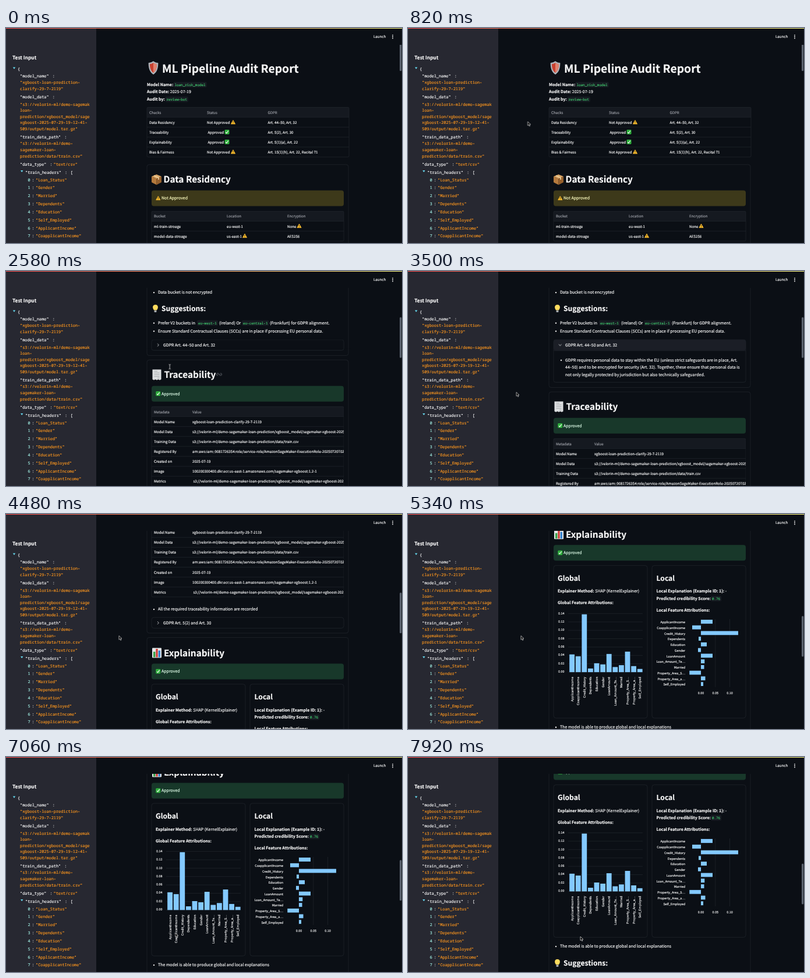
Animation, 680 px wide and 370 px high, one loop 8000 ms. Source, as an HTML page:

```html
<!DOCTYPE html>
<html lang="en">
<head>
<meta charset="utf-8">
<title>ML Pipeline Audit Report</title>
<style>
@property --scroll { syntax: "<number>"; inherits: true; initial-value: 0; }
html, body { margin: 0; width: 100%; height: 100%; overflow: hidden; background: #0b0f15; }
svg { position: absolute; left: 0; top: 0; animation: scroll 8s linear infinite; }
text { font-family: "Noto Sans CJK JP", "Noto Sans CJK SC", "Noto Sans CJK", "Open Sans", sans-serif;
  color: #fafafa; fill: currentColor; stroke: currentColor; stroke-width: .16;
  white-space: pre; text-rendering: geometricPrecision; }
.b { font-weight: 700; }
.dim { color: #9a9da4; }
.mono { font-family: "Noto Sans Mono", "DejaVu Sans Mono", monospace; }
.code { color: #3fc86d; }
.val { color: #fd971f; }
.idx { color: #a1efe4; }
.end { text-anchor: end; }
.mid { text-anchor: middle; }
.line { fill: none; stroke: #262a32; stroke-width: .6; }
.page { transform: translateY(calc(var(--scroll) * -1px)); }
.thumb { transform: translateY(calc(var(--scroll) * .197px)); }
.below { animation: expand 8s linear infinite; }
.opened { animation: reveal 8s linear infinite; }
.chevron { transform-box: fill-box; transform-origin: center; animation: turn 8s linear infinite; }
.cursor { animation: move 8s linear infinite; }
.arrow { animation: arrow 8s step-end infinite; }
.beam { animation: beam 8s step-end infinite; }
@keyframes scroll {
  0%, 15.25% { --scroll: 0; }
  17.75% { --scroll: 39; }
  20% { --scroll: 150; }
  22.5% { --scroll: 300; }
  24.25% { --scroll: 362; }
  26%, 46% { --scroll: 383.5; }
  48% { --scroll: 425; }
  51% { --scroll: 560; }
  53.5% { --scroll: 645; }
  56%, 58% { --scroll: 666; }
  60% { --scroll: 710; }
  63% { --scroll: 825; }
  67.5%, 97% { --scroll: 879; animation-timing-function: ease-in; }
  99%, 100% { --scroll: 911; }
}
@keyframes expand {
  0%, 36% { transform: none; animation-timing-function: ease-in-out; }
  40.5%, 100% { transform: translateY(55px); }
}
@keyframes reveal {
  0%, 36% { opacity: 0; }
  38%, 100% { opacity: 1; }
}
@keyframes turn {
  0%, 36% { transform: none; }
  38%, 100% { transform: rotate(90deg); }
}
@keyframes move {
  0%, 2.75% { transform: translate(262px, 376px); animation-timing-function: ease-out; }
  12.25%, 26% { transform: translate(201.5px, 145.5px); }
  30.25% { transform: translate(215px, 149px); }
  32.25% { transform: translate(279px, 161px); animation-timing-function: ease-out; }
  35.25%, 37% { transform: translate(300px, 124px); animation-timing-function: ease-in-out; }
  43.75% { transform: translate(186px, 208.5px); }
  56%, 71.75% { transform: translate(194px, 209.5px); }
  78% { transform: translate(229px, 228.5px); animation-timing-function: ease-out; }
  91.25%, 100% { transform: translate(296px, 309px); }
}
@keyframes arrow {
  0% { opacity: 0; }
  2.75% { opacity: 1; }
  31.5% { opacity: 0; }
  33.5%, 100% { opacity: 1; }
}
@keyframes beam {
  0% { opacity: 0; }
  31.5% { opacity: 1; }
  33.5%, 100% { opacity: 0; }
}
</style>
</head>
<body>
<svg id="stage" width="680" height="370"></svg>
<script>
const BG = '#0b0f15';
const BODY = 7, SMALL = 6.15, TINY = 5.35, H1 = 19.3, H2 = 15.35, H3 = 12.1, JSON_SIZE = 6.88, CODE = 5.9;

// y is the middle of the capitals
const text = (x, y, str, size = BODY, cls = '', extra = '') =>
  `<text x="${x}" y="${y + size * .37}" font-size="${size}" class="${cls}" ${extra}>${str}</text>`;
const bold = str => `<tspan class="b">${str}</tspan>`;
const rect = (x, y, w, h, fill, r = 0) => `<rect x="${x}" y="${y}" width="${w}" height="${h}" rx="${r}" fill="${fill}"/>`;
const box = (x, y, w, h, r = 4) => `<rect class="line" x="${x}" y="${y}" width="${w}" height="${h}" rx="${r}"/>`;
const path = (d, fill = 'none', stroke = 'none', w = 1) => `<path d="${d}" fill="${fill}" stroke="${stroke}" stroke-width="${w}"/>`;
const line = d => `<path class="line" d="${d}"/>`;
const at = (x, y, inner) => `<g transform="translate(${x} ${y})">${inner}</g>`;
const list = (items, fn) => items.map(fn).join('');

const chip = (x, y, str) =>
  rect(x, y - 4.7, str.length * CODE * .6 + 4, 9.4, '#171b22', 2) + text(x + 2, y, str, CODE, 'mono code');
const bullet = (x, y, str) => `<circle cx="${x - 7}" cy="${y + .6}" r="1.2" fill="#fafafa"/>` + text(x, y, str);

// Small pictograms, centred on x, y
const warn = (x, y) => at(x, y, path('M0 -3.4 3.7 3.2 -3.7 3.2Z', '#ffc02e', '#ffc02e', .6) + path('M0 -1.4V1M0 1.8V2.5', 'none', '#33270a', .9));
const check = (x, y) => at(x, y, rect(-4, -4, 8, 8, '#2fae3c', 1.4) + path('M-2.2 .2 -.7 2 2.3 -2.2', 'none', '#fff', 1.1));
const shield = (x, y) => at(x, y,
  path('M0 -11.5Q4 -8.5 8.3 -8.5C8.5 1 6 8 0 11.5C-6 8 -8.5 1 -8.3 -8.5Q-4 -8.5 0 -11.5Z', '#aeb4ba') +
  path('M0 -8.8Q3 -6.6 6 -6.4C6 1 4 6 0 8.6C-4 6 -6 1 -6 -6.4Q-3 -6.6 0 -8.8Z', '#c9402f') +
  path('M0 -8.8Q3 -6.6 6 -6.4C6 1 4 6 0 8.6Z', '#e0826f'));
const parcel = (x, y) => at(x, y,
  path('M0 -8.5 8.5 -5 0 -1 -8.5 -5Z', '#d9a566') + path('M-8.5 -5 0 -1V9.5L-8.5 5Z', '#b57a3d') +
  path('M8.5 -5 0 -1V9.5L8.5 5Z', '#96602c') + path('M-4.5 -6.6 3.6 -2.8V.5', 'none', '#efd3a2', 1.6));
const bulb = (x, y) => at(x, y,
  path('M0 -6.5C5.3 -6.5 5.5 -.5 2.2 3H-2.2C-5.5 -.5 -5.3 -6.5 0 -6.5Z', '#ffdc5e') + rect(-2, 3.2, 4, 3.2, '#a9adb1', 1));
const receipt = (x, y) => at(x, y,
  path('M-7.5 -9H7.5V8L5 9.2 2.5 8 0 9.2 -2.5 8 -5 9.2 -7.5 8Z', '#dcdee0') +
  path('M-4.5 -6H1M-4.5 -3H4.5M-4.5 0H4.5M-4.5 3H4.5M1 5.7H4.5', 'none', '#a2a6aa', .9));
const barsIcon = (x, y) => at(x, y,
  rect(-8, -8.5, 16, 17, '#e4e8ea', 1) + rect(-6, -2, 3.4, 9.5, '#37a047') + rect(-1.7, -7, 3.4, 14.5, '#d2403a') + rect(2.6, -4, 3.4, 11.5, '#3583cf'));

const alertBox = (y, fill, icon, str, color) =>
  rect(250, y, 330, 27, fill, 4) + icon(261.3, y + 13.3) + text(267, y + 13.3, str, BODY, '', `style="color:${color}"`);
const approved = y => alertBox(y, '#18382a', check, 'Approved', '#dffde9');

// First row is the heading; each further row is 17 px high
const table = (x, y, width, cols, rows) =>
  rect(x, y, width, 17, '#151920') + box(x, y, width, rows.length * 17.1, 2) +
  list(rows, (row, i) => (i ? line(`M${x} ${y + i * 17.1}h${width}`) : '') +
    list(row, (cell, j) => text(cols[j], y + 8.8 + i * 17.1, cell, SMALL, i ? '' : 'dim')));

const expander = (y, str, cls = '') =>
  `<path class="${cls}" d="M260 ${y + 7}l2.4 2.4 -2.4 2.4" fill="none" stroke="#d5d7da" stroke-width=".9"/>` + text(270, y + 9.4, str);

const sidebar = () => {
  const key = (x, y, name, tail = '') => text(x, y, `"${name}" <tspan dx="2">:</tspan>${tail}`, JSON_SIZE, 'mono');
  const value = (y, lines) => list(lines, (s, i) => text(24, y + i * 10.6, s, JSON_SIZE, 'mono val'));
  const caret = (x, y) => path(`M${x} ${y}h4.4l-2.2 3.2z`, '#66d9ef');
  const headers = ['Loan_Status', 'Gender', 'Married', 'Dependents', 'Education', 'Self_Employed', 'ApplicantIncome', 'CoapplicantIncome'];
  return rect(0, 0, 155, 370, '#272831') + text(11, 50.5, 'Test Input', 8.4, 'b') +
    caret(11.8, 67.5) + text(20, 70, '{', JSON_SIZE, 'mono') +
    key(24, 82.7, 'model_name') + value(93.5, ['"xgboost-loan-prediction-', 'clarify-29-7-2119"']) +
    key(24, 118, 'model_data') +
    value(131, ['"s3://velorin-ml/demo-sagemak', 'loan-', 'prediction/xgboost_model/sage', 'xgboost-2025-07-29-19-12-41-', '509/output/model.tar.gz"']) +
    key(24, 187.5, 'train_data_path') + value(198.8, ['"s3://velorin-ml/demo-', 'sagemaker-loan-', 'prediction/data/train.csv"']) +
    key(24, 234.5, 'data_type') + text(81.5, 234.5, '"text/csv"', JSON_SIZE, 'mono val') +
    caret(25, 245) + key(33, 248, 'train_headers', '<tspan dx="1.5"> [</tspan>') +
    list(headers, (h, i) => {
      const y = 261 + i * 13.85;
      return text(37.5, y, i, JSON_SIZE, 'mono idx') + text(44.5, y, ':', JSON_SIZE, 'mono') + text(51, y, `"${h}"`, JSON_SIZE, 'mono val');
    });
};

const overview = () =>
  shield(253, 68.5) + text(268, 69.7, 'ML Pipeline Audit Report', H1, 'b') +
  text(242, 97, 'Model Name:', BODY, 'b') + chip(287.5, 97.5, 'loan_risk_model') +
  text(242, 109.5, bold('Audit Date:') + ' 2025-07-19') +
  text(242, 122.5, 'Audit by:', BODY, 'b') + chip(273.5, 122.8, 'review-bot') +
  table(242, 136.5, 347, [246, 345, 449.5], [
    ['Checks', 'Status', 'GDPR'],
    ['Data Residency', 'Not Approved', 'Art. 44–50, Art. 32'],
    ['Traceability', ' Approved', 'Art. 5(2), Art. 30'],
    ['Explainability', ' Approved', 'Art. 5(1)(a), Art. 22'],
    ['Bias &amp; Fairness', 'Not Approved', 'Art. 15(1)(h), Art. 22, Recital 71']]) +
  warn(390, 162) + check(379.5, 179) + check(379.5, 196) + warn(390, 213);

const residency = () =>
  box(242, 235, 346, 400) + parcel(258.5, 260.5) + text(270.5, 260.5, 'Data Residency', H2, 'b') +
  alertBox(279.5, '#3d391a', warn, 'Not Approved', '#ffffc2') +
  table(250, 315.4, 330, [254, 379, 483], [
    ['Bucket', 'Location', 'Encryption'],
    ['ml-train-stroage', 'eu-west-1', 'None'],
    ['model-data-stroage', 'us-east-1', 'AES256']]) +
  warn(503.5, 340.5) + warn(410, 357.5) +
  text(250, 385, 'Data is stored in the US') +
  bullet(261, 406.4, 'Model data is stored in the US') + bullet(261, 420, 'Data bucket is not encrypted') +
  bulb(256.5, 448) + text(267, 448, 'Suggestions:', H3, 'b') +
  bullet(261, 472.5, 'Prefer V2 buckets in') + chip(328, 473, 'eu-west-1') + text(366, 472.5, '(Ireland) Or') +
  chip(405, 473, 'eu-central-1') + text(453, 472.5, '(Frankfurt) for GDPR alignment.') +
  bullet(261, 486.5, 'Ensure Standard Contractual Clauses (SCCs) are in place if processing EU personal data.') +
  `<g class="opened">${rect(250, 501.5, 330, 19, '#1b1e26', 4)}</g>` +
  box(250, 501.5, 330, 100) + line('M250 520.5h330') + expander(501.5, 'GDPR Art. 44–50 and Art. 32', 'chevron') +
  bullet(270, 536.5, 'GDPR requires personal data to stay within the EU (unless strict safeguards are in place, Art.') +
  text(270, 549, '44–50) and to be encrypted for security (Art. 32). Together, these ensure that personal data is') +
  text(270, 561.5, 'not only legally protected by jurisdiction but also technically safeguarded.');

// Opaque, so that sliding it down uncovers the opened panel
const cover = () => rect(240, 517, 352, 1100, BG) +
  line('M250 517q0 3 4 3h322q4 0 4 -3') + line('M242 517v8q0 4 4 4h338q4 0 4 -4v-8');

const traceability = () => {
  const store = 's3://velorin-ml/demo-sagemaker-loan-prediction/';
  const model = store + 'xgboost_model/sagemaker-xgboost-2025-07-29-19-12-41';
  return box(242, 536.5, 346, 279.5) + receipt(259, 562) + text(271.5, 562, 'Traceability', H2, 'b') +
    `<g class="beam">${path('M364 563h-1a1.6 1.6 0 0 1 0 -3.2h2.4M368 559.8h1a1.6 1.6 0 0 1 0 3.2h-2.4M364.5 561.4h3', 'none', '#767a82', .8)}</g>` +
    approved(581.3) +
    `<g clip-path="url(#cells)">` + table(250, 617, 330, [254, 320], [
      ['Metadata', 'Value'],
      ['Model Name', 'xgboost-loan-prediction-clarify-29-7-2119'],
      ['Model Data', model],
      ['Training Data', store + 'data/train.csv'],
      ['Registered By', 'arn:aws:iam::9081726354:role/service-role/AmazonSageMaker-ExecutionRole-20250720T021500'],
      ['Created on', '2025-07-19'],
      ['Image', '100200300400.dkr.ecr.us-east-1.amazonaws.com/sagemaker-xgboost:1.2-1'],
      ['Metrics', ' ' + model]]) + '</g>' +
    bullet(261, 774.5, 'All the required traceability information are recorded') +
    box(250, 789, 330, 18.5) + expander(789, 'GDPR Art. 5(2) and Art. 30');
};

const features = ['ApplicantIncome', 'CoapplicantIncome', 'Credit_History', 'Dependents', 'Education', 'Gender',
  'LoanAmount', 'Loan_Amount_Te…', 'Married', 'Property_Area_S…', 'Property_Area_a…', 'Self_Employed'];
const globalBars = [30.5, 27.3, 99.5, 6.3, 15.3, 13.3, 31.3, 8.8, 12, 35.3, 10.4, 5.5];
const localBars = [20, -15, 64, -4, 10, -5, 20, 6.3, 5.5, -19.7, 7.5, 4];
const BAR = '#83c9ff';

const globalChart = () => {
  const base = 1087.3;
  return list([...Array(8).keys()], i => line(`M275 ${base - i * 14.4}h128`) +
      text(268.5, base - 1.2 - i * 14.3, (i * .02).toFixed(2), TINY, 'end')) +
    list(features, (name, i) => {
      const x = 281.6 + i * 10.6;
      return rect(x - 4.4, base - globalBars[i], 8.8, globalBars[i], BAR) +
        text(0, 0, name, TINY, 'end', `transform="translate(${x} ${base + 8.2}) rotate(-90)"`);
    });
};

const localChart = () =>
  list([0, .05, .1], v => line(`M${503 + v * 495} 996v117`) + text(503 + v * 495, 1123, v.toFixed(2), TINY, 'mid')) +
  list(features, (name, i) => {
    const y = 1000.5 + i * 9.75, w = localBars[i];
    return text(476, y + .8, name, TINY, 'end') + rect(503 + Math.min(w, 0), y - 3.4, Math.abs(w), 6.8, BAR);
  });

const explainability = () =>
  box(242, 823.5, 346, 700) + barsIcon(259, 850) + text(271, 850, 'Explainability', H2, 'b') + approved(868.5) +
  box(250, 903.8, 161, 262.5) + box(419, 903.8, 161, 262.5) +
  text(257, 926, 'Global', H3, 'b') +
  text(257, 948, bold('Explainer Method:') + ' SHAP (KernelExplainer)') +
  text(257, 968, 'Global Feature Attributions:', BODY, 'b') + globalChart() +
  text(426.5, 926, 'Local', H3, 'b') +
  text(426.5, 948, bold('Local Explanation (Example ID: 1):') + ' -') +
  text(426.5, 960.3, 'Predicted credibility Score:', BODY, 'b') + chip(520, 960.8, '0.76') +
  text(426.5, 980.5, 'Local Feature Attributions:', BODY, 'b') + localChart() +
  bullet(261, 1181.5, 'The model is able to produce global and local explanations') +
  bulb(256.5, 1210.5) + text(267, 1210.5, 'Suggestions:', H3, 'b');

const header = () => rect(155, 0, 525, 29, BG) + text(631, 15, 'Launch', SMALL) +
  list([12.3, 15, 17.7], y => `<circle cx="664" cy="${y}" r=".9" fill="#fafafa"/>`);

const cursor = () => `<g class="cursor">
  <g class="arrow">${path('M0 0V6.8L1.6 5.4 2.7 7.8 3.9 7.3 2.8 4.9H5Z', '#000', '#e8e8e8', .7)}</g>
  <g class="beam">${path('M.3 0Q2 0 2 1.2V6.8Q2 8 .3 8M3.7 0Q2 0 2 1.2M2 6.8Q2 8 3.7 8', 'none', '#e8e8e8', .8)}</g></g>`;

document.getElementById('stage').innerHTML =
  `<defs><clipPath id="cells"><rect x="249" y="610" width="331" height="150"/></clipPath>
   <linearGradient id="strip"><stop stop-color="#ff4b4b"/><stop offset="1" stop-color="#fffd80"/></linearGradient></defs>` +
  rect(0, 0, 680, 370, BG) +
  `<g class="page">${overview()}${residency()}<g class="below">${cover()}${traceability()}${explainability()}</g></g>` +
  `<g class="thumb">${rect(676, 4, 3.2, 70, '#5b636f', 1.5)}</g>` +
  header() + sidebar() + rect(0, 0, 680, 1, 'url(#strip)') + cursor();
</script>
</body>
</html>
```
